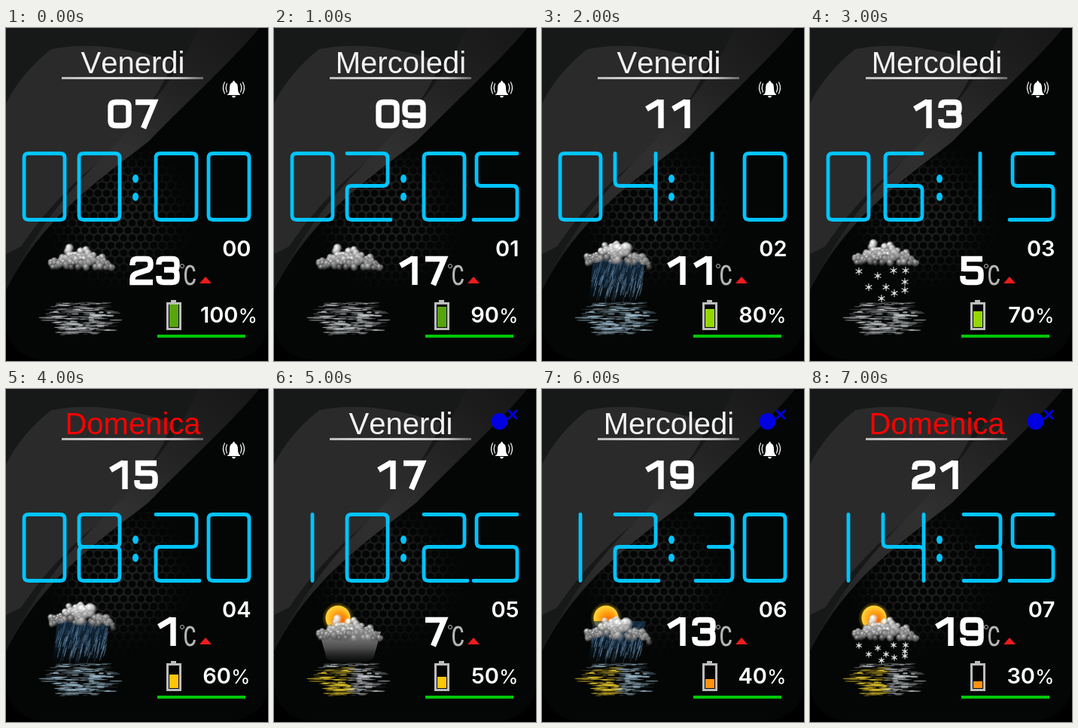
An HTML page with a canvas that plays this animation: 348x442 px, repeating every 8000 ms.

```html
<!DOCTYPE html>
<html lang="it">
<head>
<meta charset="utf-8">
<title>Watch face</title>
<style>
  html, body { margin: 0; height: 100%; overflow: hidden; background: #000; }
  canvas { display: block; }
</style>
</head>
<body>
<canvas id="face" width="348" height="442"></canvas>
<script>
const ctx = document.getElementById('face').getContext('2d');
const CYAN = '#00c4ff';

const states = [
  { day: 'Venerdi', temp: 23, sky: 'cloud' },
  { day: 'Mercoledi', temp: 17, sky: 'cloud' },
  { day: 'Venerdi', temp: 11, sky: 'rain' },
  { day: 'Mercoledi', temp: 5, sky: 'snow' },
  { day: 'Domenica', temp: 1, sky: 'rain' },
  { day: 'Venerdi', temp: 7, sky: 'sun' },
  { day: 'Mercoledi', temp: 13, sky: 'sun rain' },
  { day: 'Domenica', temp: 19, sky: 'sun snow' }
];

// Thin clock digits in a 54 x 88 box
const clockDigits = {
  0: 'M6 0H48Q54 0 54 6V82Q54 88 48 88H6Q0 88 0 82V6Q0 0 6 0Z',
  1: 'M27 0V88',
  2: 'M0 0H48Q54 0 54 6V37Q54 43 48 43H6Q0 43 0 49V82Q0 88 6 88H58',
  3: 'M5 0H48Q54 0 54 6V37Q54 43 48 43H22M48 43Q54 43 54 49V82Q54 88 48 88H5',
  4: 'M0 0V37Q0 43 6 43H48Q54 43 54 49M54 0V88',
  5: 'M54 0H6Q0 0 0 6V37Q0 43 6 43H48Q54 43 54 49V82Q54 88 48 88H-4',
  6: 'M52 0H9Q3 0 3 6V82Q3 88 9 88H46Q52 88 52 82V49Q52 43 46 43H3',
  8: 'M6 0H48Q54 0 54 6V37Q54 43 48 43H6Q0 43 0 37V6Q0 0 6 0ZM6 43H48Q54 43 54 49V82Q54 88 48 88H6Q0 88 0 82V49Q0 43 6 43Z'
};

// Heavy digits in a 32 x 38 box
const boldDigits = {
  0: 'M11 3.5H21Q28 3.5 28 10V28Q28 34.5 21 34.5H11Q4 34.5 4 28V10Q4 3.5 11 3.5Z',
  1: 'M4 12.500L21 2.500M23 0V38',
  2: 'M4 12V10Q4 3.5 10 3.5H22Q28 3.5 28 9V12Q28 17 23 18.5L9 23Q4 25 4 30V34.5H31',
  3: 'M4 11V9Q4 3.5 10 3.5H22Q28 3.5 28 9V13Q28 18 23 18H11M23 18Q28 19 28 24V29Q28 34.5 22 34.5H10Q4 34.5 4 29V26',
  5: 'M30 3.5H5.5V20M5 16.5H22Q28 16.5 28 22V28Q28 34.5 22 34.5H10Q4 34.5 4 29V26',
  7: 'M2 3.5H27L12.500 38',
  9: 'M28 21H10Q4 21 4 15V9Q4 3.5 10 3.5H22Q28 3.5 28 9V28Q28 34.5 22 34.5H10Q4 34.5 4 29V27'
};

const flakes = [[65, 323], [90, 329], [111, 322], [127, 322], [78, 344],
  [101, 344], [126, 337], [95, 359], [126, 348], [112, 352]];

let seed;
function random() {
  seed = (seed * 16807) % 2147483647;
  return seed / 2147483647;
}
const between = (a, b) => a + (b - a) * random();
const pad = n => String(n).padStart(2, '0');

function fill(path, color) {
  ctx.fillStyle = color;
  ctx.fill(new Path2D(path));
}

function stroke(path, color, width, x = 0, y = 0) {
  ctx.save();
  ctx.translate(x, y);
  ctx.strokeStyle = color;
  ctx.lineWidth = width;
  ctx.stroke(new Path2D(path));
  ctx.restore();
}

function rect(x, y, w, h, color) {
  ctx.fillStyle = color;
  ctx.fillRect(x, y, w, h);
}

function oval(x, y, rx, ry, color) {
  ctx.fillStyle = color;
  ctx.beginPath();
  ctx.ellipse(x, y, rx, ry, 0, 0, 7);
  ctx.fill();
}

function text(string, x, y, font, color, align) {
  ctx.font = font;
  ctx.textAlign = align;
  ctx.fillStyle = color;
  ctx.fillText(string, x, y);
}

function gradient(g, ...colors) {
  colors.forEach((c, i) => g.addColorStop(i / (colors.length - 1), c));
  return g;
}
const radial = (x, y, r, ...colors) =>
  gradient(ctx.createRadialGradient(x, y, 0, x, y, r), ...colors);

function boldNumber(value, right, y) {
  const digits = String(value);
  [...digits].forEach((d, i) =>
    stroke(boldDigits[d], '#fff', 7.4, right - 35 * (digits.length - i), y));
}

function drawBackground() {
  rect(0, 0, 348, 442, '#000');
  ctx.beginPath();
  ctx.roundRect(0, -60, 348, 500, 48);
  ctx.fillStyle = '#040605';
  ctx.fill();

  // Dark mesh that shows only below the swoosh
  oval(150, 250, 105, 105, radial(150, 250, 105, '#222222', '#1d1d1dcc', '#10101000'));
  for (let row = 0; row < 21; row++) {
    for (let col = 0; col < 19; col++) {
      oval(48 + col * 11.4 + row % 2 * 5.7, 150 + row * 9.9, 4.8, 4.6, '#040505');
    }
  }

  ctx.save();
  ctx.clip(new Path2D('M0 0H336C306 38 228 110 190 150C120 205 50 250 0 348Z'));
  rect(0, 0, 348, 350, '#171818');
  fill('M0 100Q20 60 60 28Q130 14 222 45Q190 120 120 180Q60 230 20 290L0 300Z', '#2a2a2a');
  fill('M256 0H340V20C300 70 240 105 190 150C120 205 50 250 0 348C30 285 70 230 120 180C180 120 225 70 256 0Z',
    gradient(ctx.createLinearGradient(320, 0, 0, 340), '#171717', '#222222', '#303030', '#2a2a2a', '#161616'));
  ctx.restore();
}

function drawReflection(sky) {
  const sun = sky.includes('sun');
  const tint = sky.includes('rain') ? '165,195,215' : '205,208,212';
  for (let i = 0; i < 210; i++) {
    const y = between(364, 407);
    const spread = 56 - Math.abs(y - 380) * .8;
    const x = 102 + (random() + random() - 1) * spread;
    const warm = sun && x < 100 && y > 370;
    oval(x, y, between(3, 12), between(.4, 1.1),
      `rgba(${warm ? '248,215,50' : tint},${between(.12, .75)})`);
  }
}

// Puffs run from the crown down to the base, each lit from the upper left
function drawCloud(top) {
  const count = 110;
  for (let i = 0; i < count; i++) {
    const depth = i / count;
    const u = between(-1, 1);
    const crown = 24 * (1 - Math.abs(u + .08) ** 1.5) + 3 * Math.sin(u * 11);
    const x = 101 + u * 42;
    const y = top + 29 - crown * (1 - depth) + between(-2, 3);
    const r = between(4, 8) * (1 - .35 * Math.abs(u));
    const shade = 235 - (y - top - 8) * 5 + between(-30, 30);
    const color = (level, a) => {
      const v = Math.round(Math.min(255, Math.max(70, level)));
      return `rgba(${v},${v},${v},${a})`;
    };
    const lit = ctx.createRadialGradient(x - r * .3, y - r * .4, 0, x, y, r);
    oval(x, y, r, r,
      gradient(lit, color(shade + 55, 1), color(shade + 15, .85), color(shade - 25, .6), color(shade - 40, 0)));
  }
}

function drawRain() {
  fill('M68 308H138L126 364H62Z',
    gradient(ctx.createLinearGradient(0, 308, 0, 366), '#1a3a58aa', '#14304a88', '#0a1a2a00'));
  for (let i = 0; i < 130; i++) {
    const x = between(70, 136), y = between(308, 350), l = between(6, 18);
    stroke(`M${x} ${y}l${-l * .28} ${l}`, `rgba(125,170,210,${between(.15, .6)})`, .9);
  }
}

function drawSnow(toY, size) {
  for (const [x, flakeY] of flakes) {
    const y = toY(flakeY);
    for (let k = 0; k < 3; k++) {
      const dx = size * Math.cos(k * Math.PI / 3 + .5);
      const dy = size * Math.sin(k * Math.PI / 3 + .5);
      stroke(`M${-dx} ${-dy}L${dx} ${dy}`, '#b8bcbe', 1.3, x, y);
    }
    oval(x, y, 2, 2, '#d5d8da');
  }
}

function drawWeather(sky) {
  seed = 4711;
  const sun = sky.includes('sun');
  drawReflection(sky);
  if (sun) {
    oval(85, 304, 21, 21, radial(85, 304, 21, '#ffd000', '#ffc800cc', '#ffc80000'));
    oval(85, 304, 16.5, 16.5,
      gradient(ctx.createRadialGradient(90, 309, 2, 85, 304, 16.5), '#f56a00', '#ff9a10', '#ffd83a'));
  }
  if (sky === 'sun') {
    fill('M60 322H142L132 358Q100 372 70 358Z',
      gradient(ctx.createLinearGradient(0, 322, 0, 366), '#8a8a8a', '#4c4c4c', '#22222200'));
  }
  if (sky.includes('rain')) drawRain();
  if (sky.includes('snow')) drawSnow(y => sun ? 340 + (y - 322) * .55 : y, sun ? 3.8 : 4.6);
  drawCloud(sky === 'cloud' ? 287 : sun ? 300 : 281);
}

function drawBell() {
  fill('M295 88Q297 86 297 80Q297 73 301 72Q301 70 302.500 70Q304 70 304 72Q308 73 308 80Q308 86 311 88V89H294V88ZM300 90H305Q304.500 92.500 302.500 92.500Q300.500 92.500 300 90Z', '#fff');
  stroke('M293.500 74Q291 79.500 293.500 85M290.500 72Q286.500 79.500 290.500 87M311.500 74Q314 79.500 311.500 85M314.500 72Q318.500 79.500 314.500 87', '#eee', 1.3);
}

function drawBattery(level) {
  const color = level >= 90 ? '#56a50c' : level >= 70 ? '#94d800' : level >= 50 ? '#ffc60a' : '#ff930f';
  const h = Math.round(30 * level / 100);
  rect(219, 361, 7, 4, '#bdbdbd');
  rect(213, 364, 20, 37, '#bdbdbd');
  rect(216, 367, 14, 31, '#050505');
  rect(217, 397 - h, 12, h, color);

  const right = level === 100 ? 308.5 : 299;
  text(level, right, 391, '600 29px Inter, sans-serif', '#fff', 'right');
  text('%', right, 391, '400 26px Inter, sans-serif', '#fff', 'left');
}

function draw(step) {
  const { day, temp, sky } = states[step];
  drawBackground();

  ctx.fontKerning = 'none';
  text(day, 168.5, 60, '40px "Liberation Sans", Arial, sans-serif', day === 'Domenica' ? '#f00' : '#f4f4f4', 'center');
  rect(74, 65, 188, 3, gradient(ctx.createLinearGradient(74, 0, 262, 0),
    '#bbb', '#ccc', '#ddd', '#ddd', '#ccc', '#bbb', '#666'));
  boldNumber(pad(7 + 2 * step), 205, 95);

  ctx.lineCap = ctx.lineJoin = 'round';
  [...(pad(2 * step) + pad(5 * step))].forEach((d, i) =>
    stroke(clockDigits[d], CYAN, 4.8, [24, 97, 199, 269][i], 166.5));
  oval(172, 200, 4, 5.5, CYAN);
  oval(172, 224, 4, 5.5, CYAN);

  if (step >= 5) {
    oval(299.5, 43, 11, 11, '#0000e0');
    stroke('M312 29L322 39M322 29L312 39', '#0000e0', 3);
  }
  if (step < 7) drawBell();
  drawWeather(sky);
  ctx.lineCap = 'butt';
  ctx.lineJoin = 'miter';

  text(pad(step), 325.5, 303, '600 29px Inter, sans-serif', '#fff', 'right');
  boldNumber(temp, 234, 303);
  stroke('M236.500 316A2.500 2.500 0 1 1 231.500 316A2.500 2.500 0 1 1 236.500 316', '#bbb', 1);
  stroke('M250 323Q249 316 244.500 316Q238.500 316 238.500 328Q238.500 340 244.500 340Q249.500 340 250.500 333', '#b5b5b5', 3);
  fill('M257 339L265 330L273 339Z', '#ee1c1c');
  drawBattery(100 - 10 * step);
  rect(201, 407, 117, 4, '#00c808');
}

let shown = -1;
function tick(now) {
  const step = Math.floor(now / 1000) % states.length;
  if (step !== shown) draw(shown = step);
  requestAnimationFrame(tick);
}
tick(performance.now());
</script>
</body>
</html>
```
